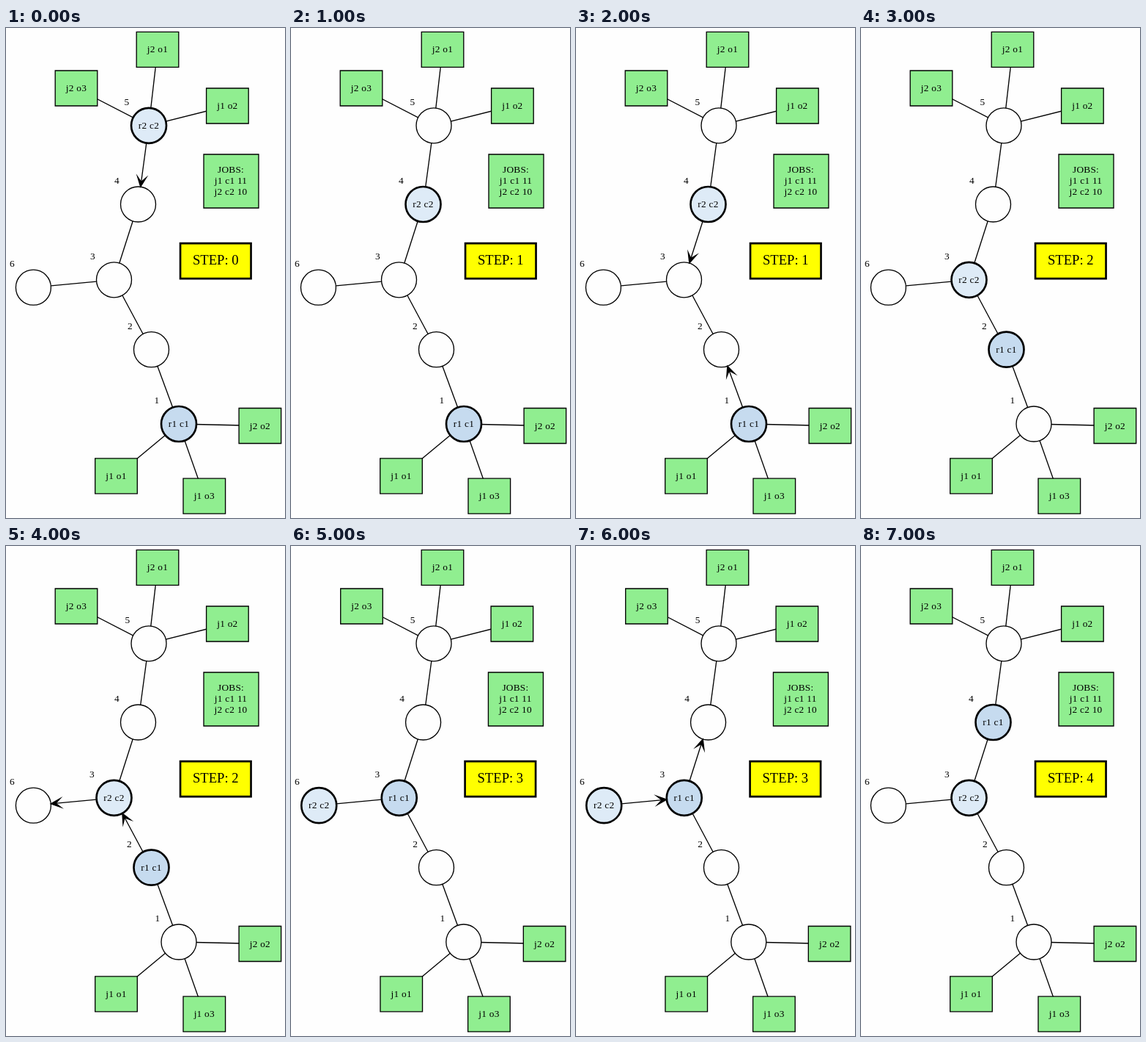
Animation of 381x667 px, one loop 8000 ms. Source, as an HTML page with a canvas:

```html
<!DOCTYPE html>
<html lang="en">
<head>
<meta charset="utf-8">
<title>Robots moving along a graph</title>
<style>
html, body { margin: 0; height: 100%; overflow: hidden; background: #fefefe; }
canvas { display: block; }
</style>
</head>
<body>
<canvas width="381" height="667"></canvas>
<script>
const ctx = document.querySelector('canvas').getContext('2d');
const R = 24, THIN = 4 / 3, BOLD = 8 / 3;
const PAPER = '#fefefe', GREEN = '#90ee90';

const nodes = {
  1: { x: 236, y: 539 }, 2: { x: 198.5, y: 437.7 }, 3: { x: 147.5, y: 342.8 },
  4: { x: 180.5, y: 240 }, 5: { x: 195, y: 132.8 }, 6: { x: 37.4, y: 353.2 }
};
const links = ['12', '23', '34', '45', '36'];

const orders = [
  { name: 'j2 o1', at: 5, x: 207, y: 29.3 },
  { name: 'j2 o3', at: 5, x: 96, y: 82 },
  { name: 'j1 o2', at: 5, x: 302.4, y: 106 },
  { name: 'j2 o2', at: 1, x: 346.9, y: 541.5 },
  { name: 'j1 o1', at: 1, x: 150.5, y: 609.8 },
  { name: 'j1 o3', at: 1, x: 270.8, y: 637.2 }
];

// route lists the node occupied at each step
const robots = [
  { name: 'r1 c1', fill: '#c6dbef', route: '11234' },
  { name: 'r2 c2', fill: '#deebf7', route: '54363' }
];

// the layout narrows slightly while node 6 is occupied
let squeeze = 0;
const fit = x => x + (195 - x) * squeeze;

function text(str, x, y, size = 40 / 3) {
  ctx.font = `${size}px "Liberation Serif", serif`;
  ctx.letterSpacing = size < 15 ? '0.25px' : '0px';
  ctx.fillStyle = '#000';
  ctx.fillText(str, fit(x), y);
}

function shape(fill, weight) {
  ctx.fillStyle = fill;
  ctx.lineWidth = weight;
  ctx.fill();
  ctx.stroke();
}

function line(a, b) {
  ctx.lineWidth = THIN;
  ctx.beginPath();
  ctx.moveTo(fit(a.x), a.y);
  ctx.lineTo(fit(b.x), b.y);
  ctx.stroke();
}

function box(x, y, w, h, fill, weight = THIN) {
  ctx.beginPath();
  ctx.rect(fit(x) - w / 2, y - h / 2, w, h);
  shape(fill, weight);
}

function arrow(a, b) {
  const length = 40 / 3, half = length * 0.45;
  ctx.save();
  ctx.translate(fit(b.x), b.y);
  ctx.rotate(Math.atan2(b.y - a.y, fit(b.x) - fit(a.x)));
  ctx.translate(-R, 0);
  ctx.beginPath();
  ctx.moveTo(0, 0);
  ctx.lineTo(-length, -half);
  ctx.lineTo(-length / 2, 0);
  ctx.lineTo(-length, half);
  ctx.closePath();
  shape('#000', THIN);
  ctx.restore();
}

function node(id, robot) {
  const { x, y } = nodes[id];
  ctx.beginPath();
  ctx.arc(fit(x), y, R, 0, 2 * Math.PI);
  shape(robot ? robot.fill : PAPER, robot ? BOLD : THIN);
  if (robot) text(robot.name, x, y + 3.8);
  text(id, x - (robot ? 30 : 29), y - 28);
}

// steps alternate between arriving and showing the next moves
function draw(beat) {
  const step = Math.ceil(beat / 2);
  squeeze = robots.some(r => r.route[step] === '6') ? 0.005 : 0;
  ctx.fillStyle = PAPER;
  ctx.fillRect(0, 0, 381, 667);
  ctx.textAlign = 'center';

  for (const [a, b] of links) line(nodes[a], nodes[b]);
  for (const { name, at, x, y } of orders) {
    line(nodes[at], { x, y });
    box(x, y, 57.6, 48, GREEN);
    text(name, x, y + 4);
  }
  for (const id in nodes) node(id, robots.find(r => r.route[step] === id));

  if (beat % 2 === 0) {
    for (const { route } of robots) {
      const from = route[step], to = route[step + 1];
      if (from !== to) arrow(nodes[from], nodes[to]);
    }
  }

  box(307.5, 208.5, 75, 73, GREEN);
  ['JOBS:', 'j1 c1 11', 'j2 c2 10'].forEach((row, i) => text(row, 307, 197 + i * 15));
  box(286.3, 317.2, 96.5, 48, '#ff0', BOLD);
  text('STEP: ' + step, 286.3, 322, 56 / 3);
}

function tick() {
  draw(Math.floor(performance.now() / 1000) % 8);
  requestAnimationFrame(tick);
}
tick();
</script>
</body>
</html>
```
